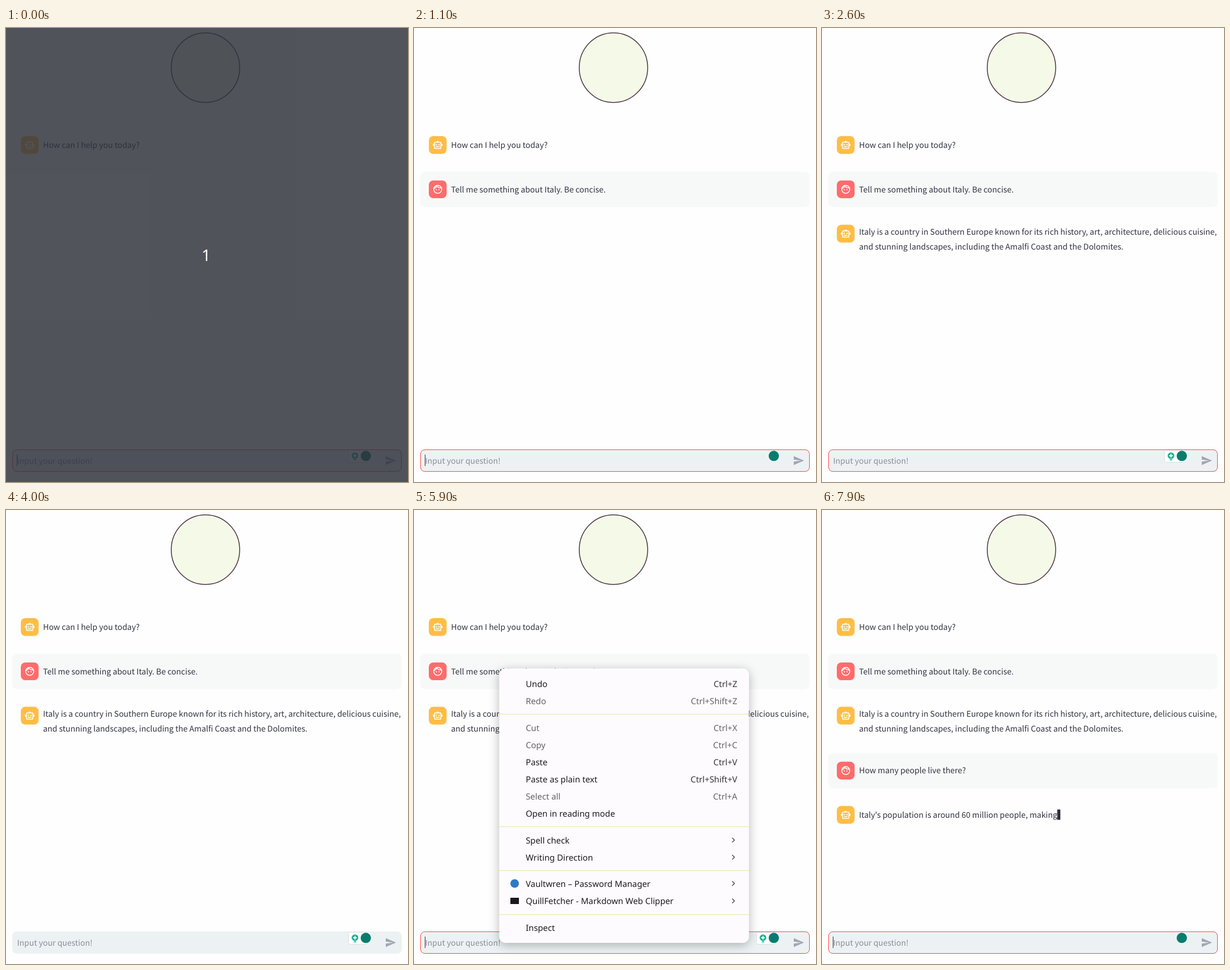
An HTML page for the animation above (8000 ms loop, 705 by 795 pixels).

```html
<!DOCTYPE html>
<html lang="en">
<head>
<meta charset="utf-8">
<title>Chat</title>
<style>
  html, body { margin: 0; width: 100%; height: 100%; overflow: hidden; background: #fefefe; }
  svg { display: block; width: 705px; height: 795px; }
  text { white-space: pre; text-rendering: geometricPrecision; }
  .chat { font: 13.93px "Noto Sans CJK JP", "Noto Sans CJK SC", "Noto Sans CJK", sans-serif; fill: #31333f; }
  .menu { font: 14.8px "Noto Sans", "Open Sans", sans-serif; fill: #1c1b1f; }
  .off { fill: #646268; }
  .key { text-anchor: end; fill: #36353a; }
  .key.off { fill: #646268; }
  #menu { filter: drop-shadow(0 4px 9px rgba(0, 0, 0, .28)); }
</style>
</head>
<body>
<svg viewBox="0 0 705 795">
  <defs>
    <g id="bot">
      <rect width="31.2" height="31.2" rx="7.8" fill="#ffbd45"/>
      <g transform="translate(6.24 6.1) scale(.78)" fill="#fff">
        <path d="M9 6a3 3 0 0 1 6 0zM4 9a3 3 0 0 0 0 6zM20 9a3 3 0 0 1 0 6z"/>
        <rect x="5" y="6" width="14" height="14" rx="1" fill="none" stroke="#fff" stroke-width="2"/>
        <circle cx="9" cy="11.5" r="1.5"/><circle cx="15" cy="11.5" r="1.5"/>
        <path d="M8 15h8v2H8z"/>
      </g>
    </g>
    <g id="user">
      <rect width="31.2" height="31.2" rx="7.8" fill="#ff6c6c"/>
      <g transform="translate(6.24 6.24) scale(.78)" fill="none" stroke="#fff" stroke-width="2">
        <circle cx="12" cy="12" r="9"/>
        <path d="M3.5 10.5Q8 9 10 4.5Q13.5 9.5 20.5 8.8"/>
        <g fill="#fff" stroke="none"><circle cx="9" cy="13" r="1.3"/><circle cx="15" cy="13" r="1.3"/></g>
      </g>
    </g>
  </defs>

  <rect width="705" height="795" fill="#fefefe"/>
  <ellipse cx="349.8" cy="69.4" rx="60" ry="61" fill="#f5fae8" stroke="#4a3440" stroke-width="1.5"/>

  <g class="chat">
    <use href="#bot" x="26" y="189.3"/>
    <text x="65" y="209.7">How can I help you today?</text>
    <g id="ask1">
      <rect x="11" y="251.5" width="683" height="62" rx="8" fill="#f7f9f9"/>
      <use href="#user" x="26" y="266.9"/>
      <text x="65" y="287.5"></text>
    </g>
    <g id="say1"><use href="#bot" x="26" y="344.6"/><text x="65"></text><text x="65" y="387.7"></text><rect width="5.5" height="18" fill="#2b2f3b"/></g>
    <g id="ask2">
      <rect x="11" y="425.5" width="683" height="62" rx="8" fill="#f7f9f9"/>
      <use href="#user" x="26" y="440.7"/>
      <text x="65" y="461.3"></text>
    </g>
    <g id="say2"><use href="#bot" x="26" y="518.3"/><text x="65"></text><text x="65" y="564"></text><rect width="5.5" height="18" fill="#2b2f3b"/></g>

    <rect x="11" y="738" width="683" height="39" rx="8" fill="#ecf2f3"/>
    <rect id="ring" x="11.5" y="738.5" width="682" height="38" rx="7.5" fill="none" stroke="#ff4b4b"/>
    <text id="field" x="19.5" y="763"></text>
    <rect id="caret" y="747" width="1" height="20" fill="#31333f"/>
  </g>
  <path id="send" transform="translate(664.3 747.2) scale(.857)" d="M2 21L23 12 2 3V10L17 12 2 14z"/>
  <g id="pill">
    <path d="M602.5 739.5H631A11 11 0 0 1 631 760.5H602.5Q600.5 760.5 600.5 758.5V741.5Q600.5 739.5 602.5 739.5z" fill="#fff" stroke="#d9dfe0"/>
    <circle cx="612" cy="749" r="5.8" fill="#12b193"/>
    <path d="M609.8 755.5h4.4v1.6h-4.4z" fill="#12b193"/>
    <path d="M612 745.8v6.4M608.8 749h6.4" stroke="#fff" stroke-width="1.8"/>
  </g>
  <circle id="badge" cx="631" cy="749.3" r="9" fill="#087c6d"/>
  <circle id="dot" cx="635" cy="749.5" r="3.2" fill="#087c6d"/>

  <g id="menu" class="menu">
    <rect x="149.5" y="277.5" width="438" height="480.5" rx="11" fill="#fdfbfe"/>
    <rect id="hover" x="149.5" width="438" height="30" fill="#000" fill-opacity=".03"/>
    <path d="M149.5 357.5h438M149.5 554.5h438M149.5 631.5h438M149.5 708.5h438" stroke="#dfe9a8"/>
    <circle cx="176.5" cy="654" r="7.5" fill="#2e78c8"/>
    <rect x="169" y="679" width="15" height="11" fill="#1b1720"/>
  </g>

  <g id="count">
    <rect width="705" height="795" fill="#2e313a" fill-opacity=".83"/>
    <text x="351" y="408" text-anchor="middle" font-family="Noto Sans, sans-serif" font-size="28" fill="#fff">1</text>
  </g>
</svg>
<script>
const $ = id => document.getElementById(id);
const show = (id, on) => $(id).setAttribute("visibility", on ? "visible" : "hidden");
const set = (el, text) => { if (el.textContent !== text) el.textContent = text; };

const ASK = ["Tell me something about Italy. Be concise.", "How many people live there?"];
const SAY = [
  "Italy is a country in Southern Europe known for its rich history, art, architecture, delicious cuisine, and stunning landscapes, including the Amalfi Coast and the Dolomites.",
  "Italy's population is around 60 million people, making"
].map(s => s.split(" "));
const FIRST_LINE = 16;

// label, shortcut (">" opens a submenu), middle of the row, disabled
const ITEMS = [
  ["Undo", "Ctrl+Z", 304], ["Redo", "Ctrl+Shift+Z", 334, 1],
  ["Cut", "Ctrl+X", 381, 1], ["Copy", "Ctrl+C", 411, 1], ["Paste", "Ctrl+V", 441],
  ["Paste as plain text", "Ctrl+Shift+V", 471], ["Select all", "Ctrl+A", 501, 1],
  ["Open in reading mode", "", 531], ["Spell check", ">", 578], ["Writing Direction", ">", 608],
  ["Vaultwren – Password Manager", ">", 654], ["QuillFetcher - Markdown Web Clipper", ">", 684.5],
  ["Inspect", "", 731]
];
const HOVERED = [654, 608, 531, 471, 441];

function add(parent, tag, attrs, text = "") {
  const el = document.createElementNS("http://www.w3.org/2000/svg", tag);
  for (const k in attrs) el.setAttribute(k, attrs[k]);
  el.textContent = text;
  parent.append(el);
}
for (const [label, key, y, off] of ITEMS) {
  const cls = off ? "off" : "";
  add($("menu"), "text", { x: 196, y: y + 5.5, class: cls }, label);
  if (key === ">") add($("menu"), "path", { d: `M558 ${y - 4}l4 4-4 4`, fill: "none", stroke: "#46444a", "stroke-width": 1.4 });
  else if (key) add($("menu"), "text", { x: 567, y: y + 5.5, class: "key " + cls }, key);
}
ASK.forEach((q, i) => set($("ask" + (i + 1)).querySelector("text"), q));

function reply(id, words, count, visible, done, base) {
  show(id, visible);
  const [a, b] = $(id).querySelectorAll("text"), block = $(id).querySelector("rect");
  const n = Math.max(0, Math.min(words.length, Math.floor(count)));
  const wrapped = n > FIRST_LINE;
  set(a, words.slice(0, Math.min(n, FIRST_LINE)).join(" "));
  set(b, words.slice(FIRST_LINE, Math.max(n, FIRST_LINE)).join(" "));
  a.setAttribute("y", wrapped ? base - 3.3 : base);
  const last = wrapped ? b : a;
  block.setAttribute("x", 65 + (n ? last.getComputedTextLength() : 0));
  block.setAttribute("y", +last.getAttribute("y") - 14.5);
  block.setAttribute("visibility", visible && !done ? "visible" : "hidden");
}

function draw(ms) {
  const t = Math.floor(ms % 8000 / 100) * 100;
  const within = (a, b) => t >= a && t < b;

  show("count", t < 100);
  show("ask1", t >= 1000);
  show("ask2", t >= 7200);
  reply("say1", SAY[0], 10 + (t - 1700) / 100 * 3.2, t >= 1300, t >= 2300, 365.4);
  reply("say2", SAY[1], 8 + (t - 7900) / 50, t >= 7500, false, 539);

  const typed = within(700, 1000) ? ASK[0] : within(6900, 7200) ? ASK[1] : "";
  const field = $("field");
  set(field, typed || "Input your question!");
  field.style.fill = typed ? "#31333f" : "#8b8e97";
  $("send").setAttribute("fill", typed ? "#555762" : "#a2a5b1");
  $("caret").setAttribute("x", typed ? Math.round(19.5 + field.getComputedTextLength()) : 19);
  show("caret", t < 300 || within(700, 1300) || within(1900, 2500) || within(3100, 3700) || t >= 5600);
  $("ring").setAttribute("opacity", t === 3900 || t === 5600 ? .5 : within(4000, 5600) ? 0 : 1);

  const dot = within(1500, 2500);
  show("dot", dot);
  show("badge", !dot);
  show("pill", t < 1000 || within(2600, 7200));

  show("menu", within(5700, 6900));
  $("menu").setAttribute("opacity", Math.min(1, (t - 5600) / 300));
  const row = HOVERED[Math.min(4, (t - 6100) / 100)];
  show("hover", row && within(6100, 6900));
  if (row) $("hover").setAttribute("y", row - 15);
}

const start = performance.now();
(function tick() {
  draw(performance.now() - start);
  requestAnimationFrame(tick);
})();
</script>
</body>
</html>
```
